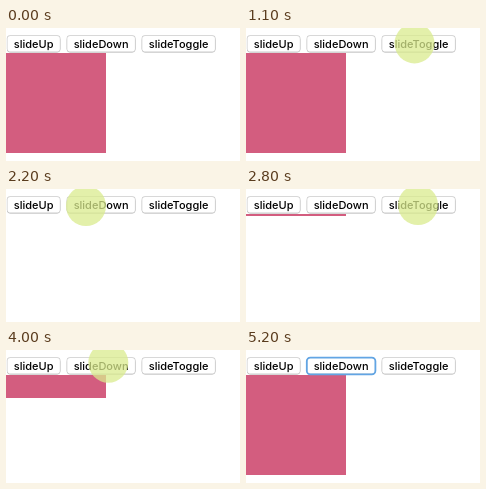
Animation of 234 by 133 pixels, one loop 5300 ms. Source, as an HTML page:

```html
<!DOCTYPE html>
<html lang="en">
<head>
<meta charset="utf-8">
<title>Slide buttons</title>
<style>
  html, body { margin: 0; width: 100%; height: 100%; overflow: hidden; background: #fff; }
  svg { display: block; width: 100vw; height: 100vh; }
  text { font: 500 11px Inter, "Open Sans", sans-serif; text-anchor: middle; fill: #000; }
  .shade { fill: #ababab; }
  .edge { fill: #cbcbcb; }
  .face { fill: #fff; }
  .ring { fill: none; stroke: #62a5e4; stroke-width: 1.8; visibility: hidden; }
  .pressed .shade, .pressed .edge { fill: #2f75dc; }
  .pressed .face { fill: url(#blue); }
  .pressed text { fill: #fff; }
  .focused .ring { visibility: visible; }
</style>
</head>
<body>
<svg id="stage" viewBox="0 0 234 133">
  <defs>
    <linearGradient id="blue" x1="0" y1="0" x2="0" y2="1">
      <stop offset="0" stop-color="#6cb2fa"/>
      <stop offset="1" stop-color="#1a6ff2"/>
    </linearGradient>
  </defs>
  <rect id="panel" x="0" y="25" width="100" height="100" fill="#d35d7f"/>
  <g id="buttons"></g>
  <circle id="pointer" r="20" fill="#daeb8e" fill-opacity=".75"/>
</svg>
<script>
const LOOP = 5300, STEP = 100, SLIDE = 400, FULL = 100;
const byId = id => document.getElementById(id);

function add(parent, tag, attrs) {
  const el = document.createElementNS("http://www.w3.org/2000/svg", tag);
  for (const key in attrs) el.setAttribute(key, attrs[key]);
  return parent.appendChild(el);
}

function makeButton(label, x, width) {
  const g = add(byId("buttons"), "g", {});
  const box = (cls, dx, y, height, rx) =>
    add(g, "rect", { class: cls, x: x + dx, y, width: width - 2 * dx, height, rx });
  box("shade", 0.2, 8.5, 16, 3.4);
  box("edge", 0, 7.3, 16.7, 3.4);
  box("face", 0.7, 8, 15.5, 2.8);
  box("ring", 0.2, 7.6, 16.8, 3.6);
  add(g, "text", { x: x + width / 2, y: 20 }).textContent = label;
  return g;
}

const up = makeButton("slideUp", 0.8, 53.7);
const down = makeButton("slideDown", 60.6, 69);
const toggle = makeButton("slideToggle", 135.6, 74);

// Each move starts where the last one ended; bend holds curve handles
const entry = [38, -10];
const moves = [
  { start: 300, end: 800, to: [161, 19], bend: [[50, 41], [105, 41]] },
  { start: 800, end: 1300, to: [168.7, 15.3], power: 4 },
  { start: 1900, end: 2200, to: [80, 17] },
  { start: 2200, end: 2700, to: [172, 16], bend: [[-130, 95], [285, 125]] },
  { start: 2800, end: 3300, to: [34.3, 12], power: 2 },
  { start: 3600, end: 4000, to: [102.3, 12.7], power: 2 },
  { start: 4000, end: 4500, to: [127, -24] }
];

const slides = [
  { start: 1577, height: 0 },
  { start: 2760, height: FULL },
  { start: 3473, height: 0 },
  { start: 3873, height: FULL }
];

const states = [
  { button: toggle, name: "pressed", at: 1500 },
  { button: toggle, name: "pressed", at: 2700 },
  { button: down, name: "pressed", at: 3800 },
  { button: down, name: "focused", at: 5200 }
];

const progress = (t, start, length) => Math.min(1, Math.max(0, (t - start) / length));
const mix = (a, b, k) => a + (b - a) * k;

function bezier(a, b, c, d, k) {
  const u = 1 - k;
  return u * u * u * a + 3 * u * u * k * b + 3 * u * k * k * c + k * k * k * d;
}

function pointerAt(t) {
  let pos = entry;
  for (const { start, end, to, bend, power = 1 } of moves) {
    if (t < start) break;
    const k = 1 - (1 - progress(t, start, end - start)) ** power;
    pos = pos.map((from, i) => bend
      ? bezier(from, bend[0][i], bend[1][i], to[i], k)
      : mix(from, to[i], k));
  }
  return pos;
}

function heightAt(t) {
  return slides.reduce((h, s) =>
    mix(h, s.height, 0.5 - Math.cos(Math.PI * progress(t, s.start, SLIDE)) / 2), FULL);
}

function draw(time) {
  const t = Math.floor((time % LOOP) / STEP) * STEP;
  byId("panel").setAttribute("height", Math.round(heightAt(t)));

  for (const button of [up, down, toggle]) {
    const state = states.find(s => s.button === button && s.at === t);
    button.setAttribute("class", state ? state.name : "");
  }

  const [x, y] = pointerAt(t), pointer = byId("pointer");
  pointer.setAttribute("cx", x);
  pointer.setAttribute("cy", y);
  pointer.setAttribute("visibility", t < moves[0].start ? "hidden" : "visible");
}

const began = performance.now();
function tick() {
  draw(performance.now() - began);
  requestAnimationFrame(tick);
}
tick();
</script>
</body>
</html>
```
